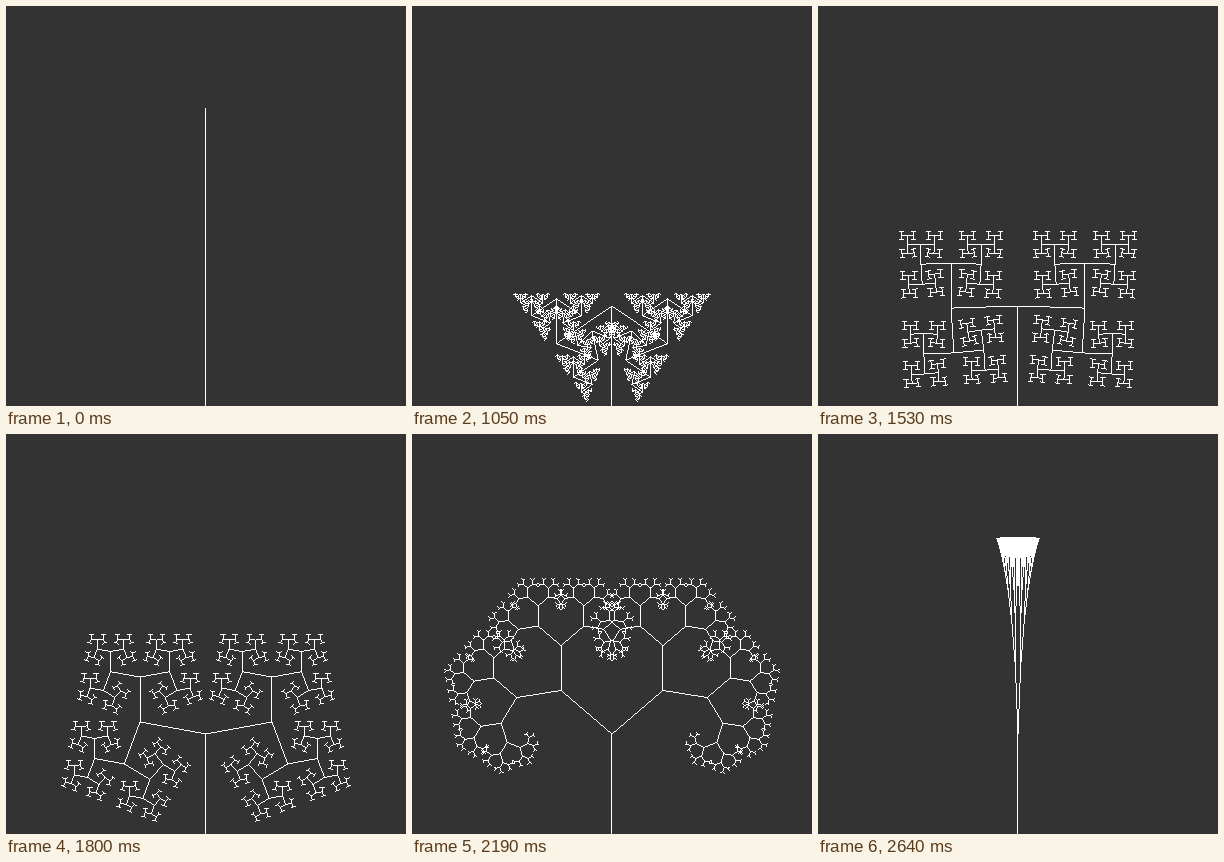
These frames come from a looping animation (400x400 px, 2730 ms). An HTML page with a canvas:

```html
<!DOCTYPE html>
<html lang="en">
<head>
<meta charset="utf-8">
<title>Fractal tree</title>
<style>
  html, body { margin: 0; width: 100%; height: 100%; overflow: hidden; background: #333; }
  canvas { display: block; width: 400px; height: 400px; }
</style>
</head>
<body>
<canvas id="stage" width="400" height="400"></canvas>
<script>
const SIZE = 400, LOOP = 2730, TICK = 30, RATIO = 0.67, MIN_LENGTH = 4;
const ctx = document.getElementById('stage').getContext('2d');

// A pointer dragged from right to left sets the branching angle: [ms, x]
const DRAG = [[120, 395], [540, 357], [1050, 276], [1530, 204], [1680, 200],
  [2010, 136], [2250, 101], [2370, 67], [2640, 5]];

function pointerAt(time) {
  if (time < DRAG[0][0]) return 0;
  const next = DRAG.findIndex(([start]) => start > time);
  if (next < 0) return DRAG.at(-1)[1];
  const [t0, x0] = DRAG[next - 1], [t1, x1] = DRAG[next];
  return Math.round(x0 + (x1 - x0) * (time - t0) / (t1 - t0));
}

// Hard-edged line, one pixel per step along its longer axis
function line(x0, y0, x1, y1) {
  const steep = Math.abs(y1 - y0) > Math.abs(x1 - x0);
  let [a0, b0, a1, b1] = steep ? [y0, x0, y1, x1] : [x0, y0, x1, y1];
  if (a0 > a1) [a0, b0, a1, b1] = [a1, b1, a0, b0];
  for (let a = Math.ceil(a0 - 0.5); a + 0.5 < a1; a++) {
    const b = Math.ceil(b0 + (b1 - b0) * (a + 0.5 - a0) / (a1 - a0) - 1e-6) - 1;
    if (steep) ctx.fillRect(b, a, 1, 1);
    else ctx.fillRect(a, b, 1, 1);
  }
}

function branch(x, y, length, heading, turn) {
  const endX = x + length * Math.sin(heading);
  const endY = y - length * Math.cos(heading);
  line(x, y, endX, endY);
  if (length > MIN_LENGTH) {
    branch(endX, endY, length * RATIO, heading + turn, turn);
    branch(endX, endY, length * RATIO, heading - turn, turn);
  }
}

function draw() {
  const time = Math.floor(performance.now() % LOOP / TICK) * TICK;
  ctx.fillStyle = '#333';
  ctx.fillRect(0, 0, SIZE, SIZE);
  ctx.fillStyle = '#fff';
  branch(SIZE / 2, SIZE, 100, 0, Math.PI * pointerAt(time) / SIZE);
  requestAnimationFrame(draw);
}
draw();
</script>
</body>
</html>
```
